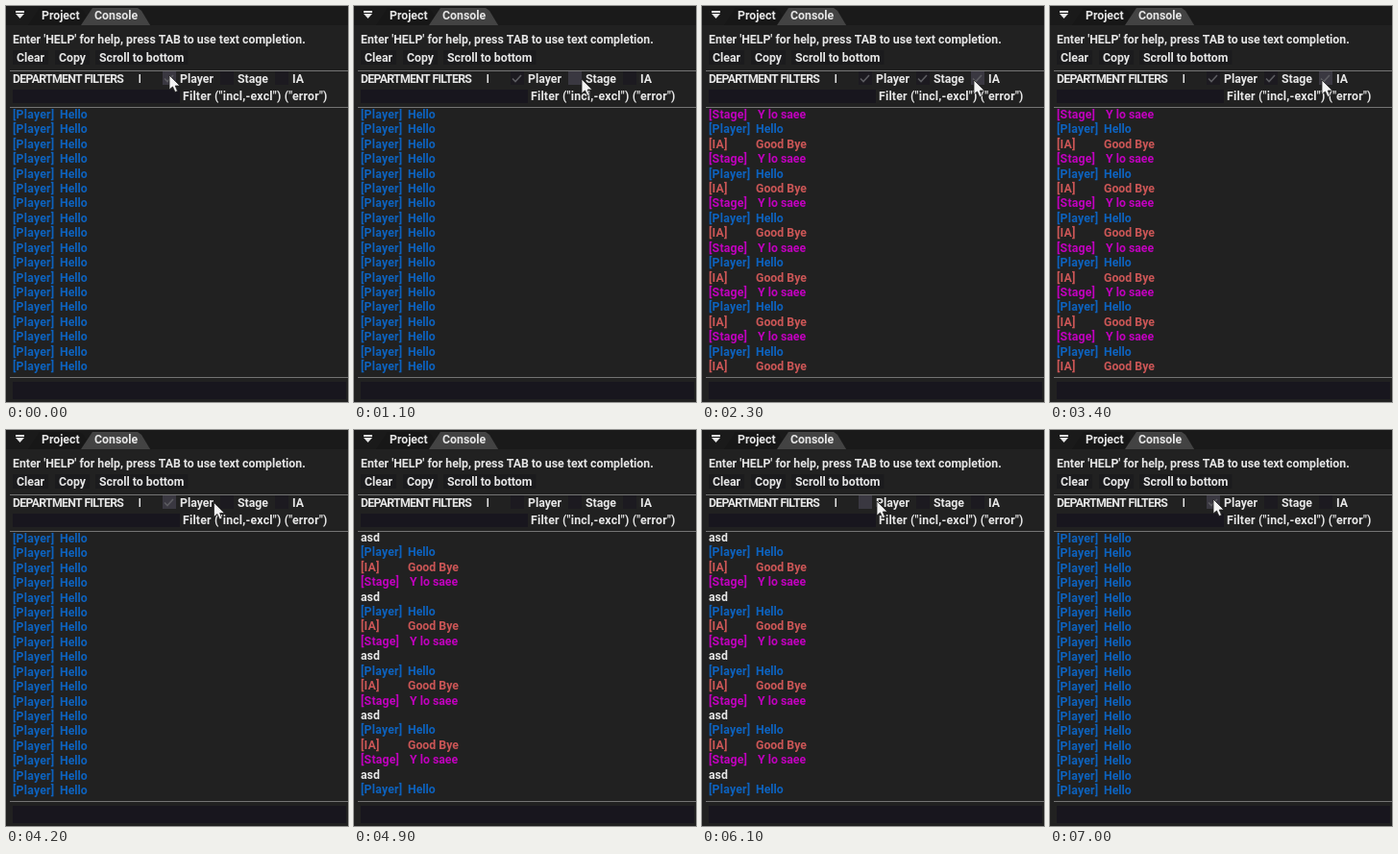
These frames come from a looping animation (356 px wide and 412 px high, 7.1 s). An HTML page with a canvas:

```html
<!DOCTYPE html>
<html lang="en">
<head>
<meta charset="utf-8">
<title>Console filters</title>
<style>
html, body { margin: 0; width: 100%; height: 100%; overflow: hidden; background: #212121; }
canvas { display: block; }
</style>
</head>
<body>
<canvas width="356" height="412"></canvas>
<script>
const ctx = document.querySelector('canvas').getContext('2d');
const LOOP = 7100, STEP = 100, MOVE = 300, CLICK = MOVE + 100;
const ROWS = 18, ROW_HEIGHT = 15.41;
const WHITE = '#e6e6e6', FIELD = '#18161e';

const messages = {
  Player: { text: 'Hello', x: 56, color: '#0d62be' },
  IA: { text: 'Good Bye', x: 56, color: '#cb5656' },
  Stage: { text: 'Y lo saee', x: 58, color: '#c000bd' }
};
const boxes = { Player: 163, Stage: 223, IA: 280 };

// Each pointer move: start time, destination, and the filter clicked on arrival
const moves = [
  { at: 800, x: 237, y: 76, click: 'Stage' },
  { at: 1700, x: 283, y: 77, click: 'IA' },
  { at: 3300, x: 283, y: 77, click: 'IA' },
  { at: 3700, x: 232, y: 76, click: 'Stage' },
  { at: 4100, x: 172, y: 74, click: 'Player' },
  { at: 4500, x: 185, y: -24 },
  { at: 5100, x: 182, y: 74 },
  { at: 6100, x: 170, y: 72, click: 'Player' }
];

function stateAt(t) {
  let { x, y } = moves[moves.length - 1];
  const active = new Set(['Player']);
  for (const m of moves) {
    if (t < m.at) break;
    const u = Math.min(1, (t - m.at) / MOVE), k = u * u * (3 - 2 * u);
    x += (m.x - x) * k;
    y += (m.y - y) * k;
    if (m.click && t >= m.at + CLICK && !active.delete(m.click)) active.add(m.click);
  }
  return { x, y, active };
}

function rect(x, y, w, h, color) {
  ctx.fillStyle = color;
  ctx.fillRect(x, y, w, h);
}

function shape(points, color) {
  ctx.beginPath();
  points.forEach(p => ctx.lineTo(...p));
  ctx.closePath();
  ctx.fillStyle = color;
  ctx.fill();
}

// Draws text centred on a line and returns its width.
function label(str, x, middle, color = WHITE, spacing = 0) {
  ctx.letterSpacing = spacing + 'px';
  ctx.fillStyle = color;
  ctx.fillText(str, x, middle + 4.3);
  return ctx.measureText(str).width;
}

function tab(str, x, middle, color) {
  const w = ctx.measureText(str).width;
  shape([[x - 14, 20], [x - 2, 2], [x + w, 2], [x + w + 4, 5], [x + w + 13, 20]], color);
  label(str, x, middle);
}

function button(str, x) {
  rect(x - 4, 46, ctx.measureText(str).width + 8, 15, '#1b1b1d');
  label(str, x, 53.5);
  return x;
}

function drawPanel() {
  rect(0, 0, 356, 412, '#212121');
  rect(0, 0, 356, 20, '#1a1a1a');
  rect(10, 5, 9, 2, WHITE);
  shape([[10, 8], [19, 8], [14.5, 13]], WHITE);
  ctx.letterSpacing = '0px';
  tab('Project', 37, 10, '#171717');
  tab('Console', 92, 10, '#434343');
  label("Enter 'HELP' for help, press TAB to use text completion.", 7, 35);
  button('Clear', 11);
  button('Copy', 55);
  button('Scroll to bottom', 97);
  for (const y of [67, 105, 386]) rect(4, y, 352, 1, '#747474');
  label('DEPARTMENT FILTERS', 7, 75.5, WHITE, -0.7);
  rect(138.5, 71, 1.5, 9, WHITE);
  rect(7, 87, 174, 14, FIELD);
  label('Filter ("incl,-excl") ("error")', 184, 94, WHITE, 0.2);
  rect(7, 391, 347, 18, FIELD);
}

function drawFilters({ x: px, y: py, active }) {
  for (const [name, x] of Object.entries(boxes)) {
    const end = x + 18 + ctx.measureText(name).width;
    const hover = px >= x && px <= end && py >= 68 && py <= 83;
    rect(x, 68, 14, 14, hover ? '#3a3841' : '#1c1a20');
    if (active.has(name)) {
      ctx.beginPath();
      ctx.moveTo(x + 2, 75.5);
      ctx.lineTo(x + 5, 78.5);
      ctx.lineTo(x + 11, 72);
      ctx.strokeStyle = '#5c5c61';
      ctx.lineWidth = 1.6;
      ctx.stroke();
    }
    label(name, x + 18, 75.5);
  }
}

function drawLog({ active }) {
  const all = !active.size;
  const cycle = all
    ? ['asd', 'Player', 'IA', 'Stage']
    : ['Stage', 'Player', 'IA'].filter(name => active.has(name));
  ctx.save();
  ctx.beginPath();
  ctx.rect(0, 107, 356, 278);
  ctx.clip();
  for (let i = 0; i < ROWS; i++) {
    const name = cycle[i % cycle.length], message = messages[name];
    const y = (all ? 112 : 113) + Math.round(i * ROW_HEIGHT);
    if (message) {
      label(`[${name}]`, 7, y, message.color, 0.2);
      label(message.text, message.x, y, message.color);
    } else {
      label(name, 7, y);
    }
  }
  ctx.restore();
}

function drawPointer({ x, y }) {
  ctx.save();
  ctx.translate(x, y);
  shape([[0, 0], [0, 15], [3.5, 12], [6, 17.5], [8.5, 16.5], [6.2, 11], [11, 11]], '#f4f4f4');
  ctx.strokeStyle = '#222';
  ctx.lineWidth = 0.8;
  ctx.stroke();
  ctx.restore();
}

function frame() {
  const state = stateAt(Math.floor(performance.now() % LOOP / STEP) * STEP);
  ctx.font = '600 12.3px Roboto, "Open Sans", sans-serif';
  drawPanel();
  drawFilters(state);
  drawLog(state);
  drawPointer(state);
  requestAnimationFrame(frame);
}
frame();
</script>
</body>
</html>
```
